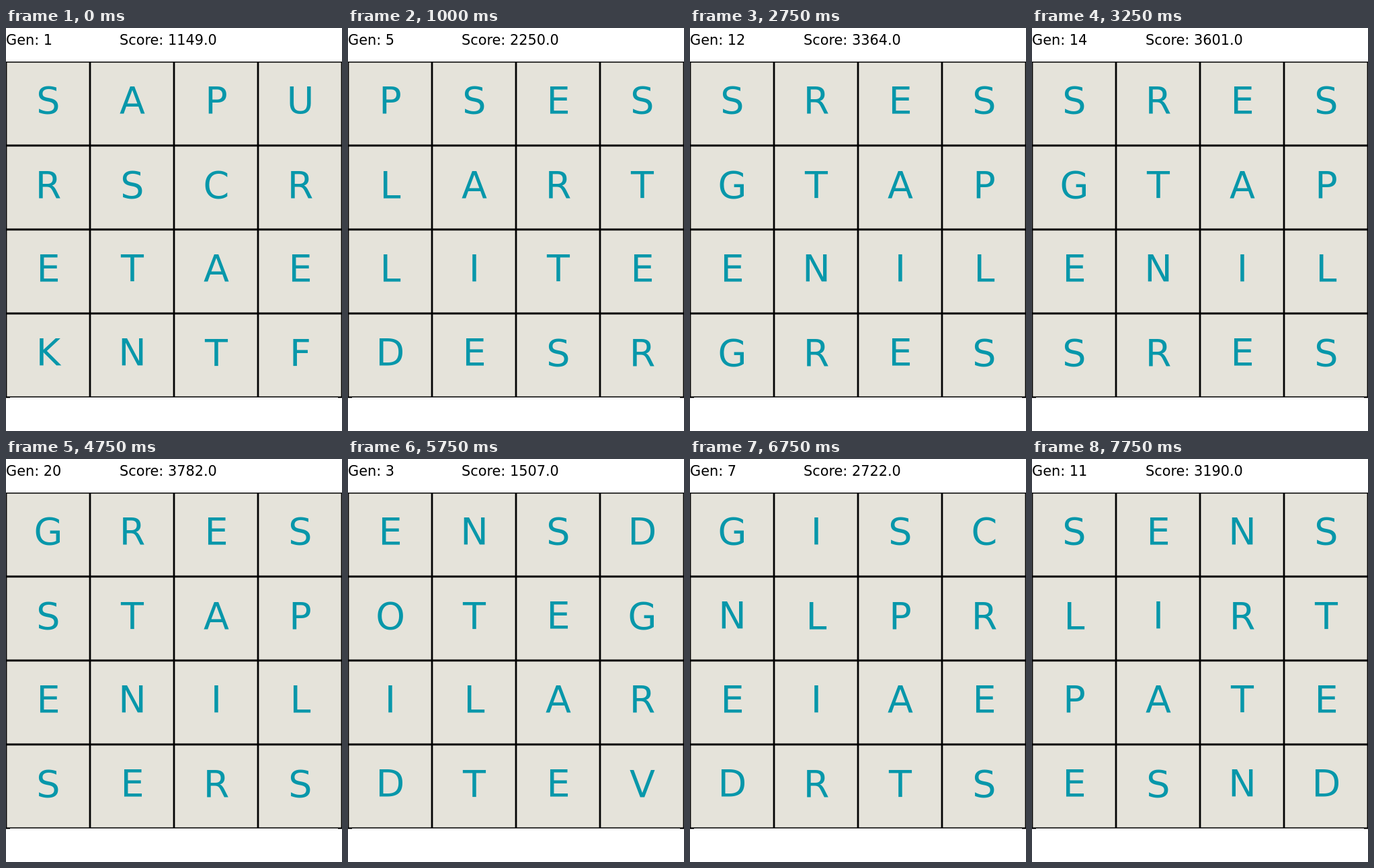
Animation, 500 px wide and 600 px high, one loop 8000 ms. Source, as an HTML page with a canvas:

```html
<!DOCTYPE html>
<html lang="en">
<head>
<meta charset="utf-8">
<title>Evolving letter grid</title>
<style>
html, body { margin: 0; width: 100%; height: 100%; overflow: hidden; background: #fff; }
canvas { display: block; }
</style>
</head>
<body>
<canvas id="stage" width="500" height="600"></canvas>
<script>
const ctx = document.getElementById("stage").getContext("2d");
const LOOP = 8000, STEP = 250, CELL = 125, TOP = 50;
const SECOND_RUN = 21; // step at which the search starts over

// Known generations of each run; the ones between are bred from their neighbours.
const runs = [
  [
    { gen: 1, score: 1149, board: "SAPURSCRETAEKNTF" },
    { gen: 5, score: 2250, board: "PSESLARTLITEDESR" },
    { gen: 9, score: 3009, board: "DSERSTAPERILGNED" },
    { gen: 14, score: 3601, board: "SRESGTAPENILSRES" },
    { gen: 21, score: 3812, board: "GRESSTAPENILSERS" }
  ],
  [
    { gen: 1, score: 1126, board: "ENSTOVEGILCRDAEP" },
    { gen: 3, score: 1507, board: "ENSDOTEGILARDTEV" },
    { gen: 7, score: 2722, board: "GISCNLPREIAEDRTS" },
    { gen: 11, score: 3190, board: "SENSLIRTPATEESND" }
  ]
];

function hash(a, b) {
  const x = Math.sin(a * 127.1 + b * 311.7) * 43758.5453;
  return x - Math.floor(x);
}

function stateAt(step) {
  const second = step >= SECOND_RUN;
  const keys = runs[second ? 1 : 0];
  const gen = step - (second ? SECOND_RUN : 0) + 1;
  const i = Math.max(0, keys.findIndex(k => k.gen >= gen) - 1);
  const from = keys[i], to = keys[i + 1];
  const p = (gen - from.gen) / (to.gen - from.gen);
  const letters = [...from.board].map((ch, n) => hash(n + 1, from.gen) < p ? to.board[n] : ch);
  return { gen, score: Math.round(from.score + (to.score - from.score) * p), letters };
}

function drawGrid() {
  ctx.save();
  ctx.beginPath();
  ctx.rect(0, TOP, 500, 500);
  ctx.clip();
  ctx.fillStyle = "#e5e3da";
  ctx.fillRect(0, TOP, 500, 500);
  ctx.strokeStyle = "#000";
  ctx.lineWidth = 2.78;
  ctx.beginPath();
  for (let i = 0; i <= 4; i++) {
    const d = i * CELL;
    ctx.moveTo(d, TOP);
    ctx.lineTo(d, TOP + 500);
    ctx.moveTo(0, TOP + d);
    ctx.lineTo(500, TOP + d);
  }
  ctx.stroke();
  ctx.restore();
  ctx.fillStyle = "#000";
  ctx.fillRect(0, 550, 6, 0.8);
  ctx.fillRect(494, 550, 6, 0.8);
}

function drawLetter(ch, n) {
  const row = Math.floor(n / 4);
  // Glyph baselines snap to whole pixels, differently on odd rows.
  const snap = row % 2 && !"DEIKN".includes(ch) ? 1 : 0;
  ctx.fillText(ch, (n % 4 + 0.5) * CELL + 0.5, 127 + row * CELL + snap);
}

function draw(step) {
  const { gen, score, letters } = stateAt(step);
  ctx.fillStyle = "#fff";
  ctx.fillRect(0, 0, 500, 600);
  drawGrid();
  ctx.font = '20.83px "DejaVu Sans", sans-serif';
  ctx.textAlign = "left";
  ctx.fillText("Gen: " + gen, 0, 25);
  ctx.fillText("Score: " + score.toFixed(1), 169, 25);
  ctx.font = '55.56px "DejaVu Sans", sans-serif';
  ctx.textAlign = "center";
  ctx.fillStyle = "#0797aa";
  letters.forEach(drawLetter);
}

function frame() {
  draw(Math.floor(performance.now() % LOOP / STEP));
  requestAnimationFrame(frame);
}
frame();
</script>
</body>
</html>
```
